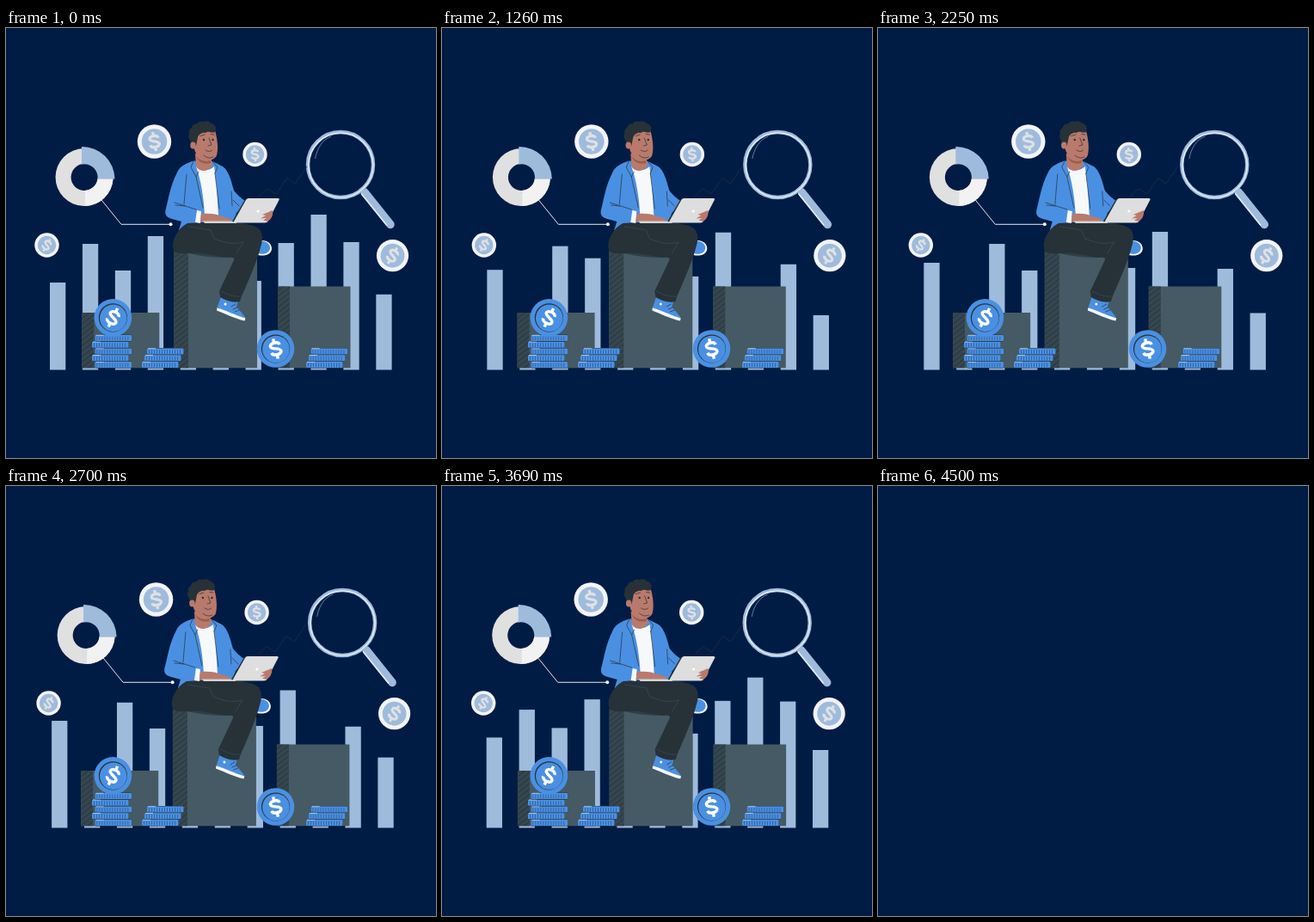
Animation of 500 by 500 pixels, one loop 4.53 s. Source, as an HTML page:

```html
<!DOCTYPE html>
<html lang="en">
<head>
<meta charset="utf-8">
<title>Finance analysis</title>
<style>
  html, body { margin: 0; height: 100%; overflow: hidden; background: #011c44; }
  svg { display: block; width: 100vw; height: 100vh; }
  .line { fill: none; stroke: #263238; stroke-width: .7; stroke-linecap: round; stroke-linejoin: round; }
  .fold { stroke: #3f4d54; }
  .skin { fill: #b97a6c; }
  .blue { fill: #4a90e2; }
  .dark { fill: #263238; }
  .pale { fill: #9fbbdc; }
  .white { fill: #f7f8fa; }
</style>
</head>
<body>
<svg viewBox="0 0 500 500">
  <defs>
    <pattern id="hatch" width="5" height="5" patternUnits="userSpaceOnUse" patternTransform="rotate(52)">
      <rect width="5" height="5" fill="#35464f"/>
      <rect width=".8" height="5" fill="#263238"/>
    </pattern>
    <path id="dollar" fill="none" stroke-width="3.5"
      d="M5.600-3.600C5-8.200-5.200-8-5.200-3.800C-5.200 .4 5.600-.6 5.600 3.800C5.600 8.200-4.800 8.200-5.800 3.600M0-12V-7M0 7V12"/>
  </defs>

  <g id="stage">
    <g id="back">
      <g id="bars" class="pale"></g>

      <!-- donut chart -->
      <path d="M90.500 140A33.500 33.500 0 1 0 124.500 175H106.500A15.500 15.500 0 1 1 91 158Z" fill="#e0e0e0"/>
      <path d="M92 207A33.500 33.500 0 0 0 124.500 176H106.500A15.500 15.500 0 0 1 92 189Z" fill="#f2f2f2"/>
      <path d="M88 138A38 38 0 0 1 126.500 175.500H106.500A15.500 15.500 0 0 0 88 158.500Z" class="pale"/>
      <path d="M111 200L134 228.300H191" fill="none" stroke="#e3e8ef"/>
      <circle cx="191.500" cy="228.300" r="2" class="white"/>

      <!-- magnifier -->
      <path d="M412.500 186L420 195" stroke="#9fbbdc" stroke-width="6"/>
      <path d="M417 191L447 228.500" stroke="#9fbbdc" stroke-width="9.500" stroke-linecap="round"/>
      <path d="M413.500 193L442.500 229" stroke="#e6ebf1" stroke-width="1.600" stroke-linecap="round"/>
      <circle cx="389" cy="159" r="38" fill="none" stroke="#9fbbdc" stroke-width="4.400"/>
      <circle cx="389.300" cy="159.500" r="37.600" fill="none" stroke="#e9edf2" stroke-width="1.400"/>
      <path d="M359.500 152C362 139 368 130 378 126" fill="none" stroke="#9fbbdc" stroke-width=".6"/>
      <g id="floaters"></g>
    </g>

    <g id="front">
      <path class="line" d="M295 195L304 187L314 193L327 174.500L336 181L350 161"/>
      <g id="blocks"></g>
      <path d="M212 260H258V267C240 267 225 265 212 262Z" fill="#2f3f47"/>

      <!-- far shoe -->
      <path d="M292 248C302 245 309 250 309 257C308 263 302 266 293 264Z" class="white"/>
      <path d="M291 248C301 246 307 250 307 256C306 262 301 264 292 262Z" class="blue"/>

      <!-- near shoe -->
      <path d="M250 312L270 317L268 324L278 336L277 339L245 327Z" class="blue"/>
      <path d="M245.500 325.500C256 328 266 334 278.500 337.500L277.500 340.500C266 338 255 332 245 328.500Z" class="white"/>
      <path d="M262 324L267 321M264 327L269 325M266 330L271 328" class="line"/>
      <circle cx="255" cy="321" r="1.500" class="white"/>

      <!-- jacket and shirt -->
      <path d="M218 154.500C208 158 202 161 199 168C191 183 189 199 185.500 212C184.500 218 187 220 193 222L204 225L201 235H262L268 215L280 202C274 199 268 193 265 189C261 174 258 165 252 161L240 155Z" class="blue"/>
      <path d="M221 161C226 166 236 167 242 161L245 184L247 218H231C230 198 227 178 221 161Z" class="white"/>
      <path d="M218 155L215 162L221 173L224 167M240 155L246 162L243 169M221 173L229 209M210 170L207 205M196 203L221 211M197 206L208 207M243 169L248 210M262 190L263 207M264 200L271 207" class="line"/>

      <!-- head -->
      <path d="M220 146L221 161C225 168 236 168 240 159L238 149Z" class="skin"/>
      <path d="M221 149C226 155 232 156 238 154V157C231 159 224 157 221 149Z" fill="#9b5e4d"/>
      <path d="M220 122C226 117 238 116 243 119C246 130 247 140 245 148C242 155 232 155 226 151C220 147 218 140 218 133Z" class="skin"/>
      <path d="M215 138L214 130Q211 127 213 123Q212 118 216 116Q217 111 222 111.500Q225 107 230 109Q235 107 238 110.500Q244 112 244 117L243 121C239 123 236 119 232 122C228 121 224 124 223 127L221 137Z" class="dark"/>
      <ellipse cx="217.500" cy="136.500" rx="3.200" ry="4" class="skin"/>
      <path d="M226 125.500L231 124M238 123.500L242 124M236 128L239 136L235 137M230 148C233 151 237 152 241 150M232 142C235 144 238 144 240 142" class="line"/>
      <g class="dark"><circle cx="230" cy="130" r="1.200"/><circle cx="240.500" cy="130" r="1.200"/></g>

      <!-- legs -->
      <path d="M211 227C198 234 190 251 196 260C201 264 214 261 228 262L258 267C264 266 266 267 265 270L248 306L249 313C256 317 264 320 272 318L274 312C282 294 293 268 296 255C300 243 298 234 290 231C282 227 260 225 245 225Z" class="dark"/>
      <path d="M213 231L238 235L242 245C255 250 264 252 276 249L268 262M250 306C258 310 265 313 273 312" class="line fold"/>

      <!-- hands and laptop -->
      <path d="M222 212L227 213L226 227L220 226Z" class="white"/>
      <path d="M227 216C237 215 245 216 251 219L262 222L259 225H226Z" class="skin"/>
      <path d="M229 224.500H268V227H231Z" fill="#d4d4d4"/>
      <path d="M278 199L263 225L268 226L283 200Z" class="dark"/>
      <path d="M282 198H316Q318.500 198 317.500 200L305 224Q304 226.500 301 226.500H266Q264 226.500 265.500 224L279 200Q280 198 282 198Z" fill="#dedede"/>
      <circle cx="293" cy="213" r="1.600" fill="#fff"/>
      <path d="M310 212C311 217 309 222 304 225L299 223.500L303 221L296 221.500L302 218L298 217Z" class="skin"/>
    </g>
    <g id="money"></g>
  </g>
</svg>

<script>
const LOOP = 4530, BLANK_AT = 4500, FLOOR = 397.5;
const $ = id => document.getElementById(id);
const smooth = u => u * u * (3 - 2 * u);
const wave = t => (1 + Math.cos(t / LOOP * 2 * Math.PI)) / 2;

const rect = (x, y, w, h, extra = '') => `<rect x="${x}" y="${y}" width="${w}" height="${h}" ${extra}/>`;
const circle = (x, y, r, extra) => `<circle cx="${x}" cy="${y}" r="${r}" ${extra}/>`;
const dollar = (x, y, size, tilt, color) =>
  `<use href="#dollar" stroke="${color}" transform="translate(${x} ${y}) rotate(${tilt}) scale(${size})"/>`;

// Each bar swings once per loop from its resting top to a second top, reached at peak.
const swing = (rest, far, peak = 2200) => t => rest + (far - rest) * smooth(smooth(wave(t - peak)));
const hidden = swing(300, 300);
const barTops = [
  swing(296, 273, 2300), swing(251, 370), swing(282, 251, 2050), swing(242, 282, 2300),
  hidden, hidden,
  swing(294, 279, 2500), swing(250, 237, 2000), swing(217, 330, 2150), swing(249, 280, 2150),
  swing(307, 334, 1450)
];
$('bars').innerHTML = barTops.map((_, i) => rect(51 + 37.93 * i, 0, 18.3, 0)).join('');
const bars = [...$('bars').children];

const paleCoin = (x, y, r, tilt) => circle(x, y, r, 'fill="#f3f4f5"')
  + circle(x, y, r * .75, 'class="pale"') + dollar(x, y, r / 21, tilt, '#dfe1e4');

const blueCoin = (x, y, tilt) => circle(x, y, 21.8, 'class="blue"') + circle(x, y, 16.6, 'class="dark"')
  + circle(x + .4, y + .5, 15.8, 'class="blue"') + dollar(x, y, 1, tilt, '#fff');

const block = (x, y, w, side) => rect(x, y, w, 395.3 - y, 'fill="#455a64"')
  + rect(x, y, side, 395.3 - y, 'fill="url(#hatch)"');

function stack(count, leftOf) {
  return Array.from({ length: count }, (_, i) => {
    const x = leftOf(i), y = 388 - 7.75 * i;
    return rect(x, y - .4, 42.5, 7.8, 'rx="1" class="dark"')
      + rect(x, y, 42.5, 7, 'rx="1" class="blue"')
      + `<path d="M${x + 2} ${y + 4}h39" stroke="#2c5590" stroke-width="5" stroke-dasharray=".7 2.3"/>`
      + `<path d="M${x + 1} ${y + .2}h9" stroke="#dfe9f5" stroke-width=".7"/>`;
  }).join('');
}

$('floaters').innerHTML = paleCoin(172.5, 132, 19.7, -10) + paleCoin(289.5, 147, 14.2, -5)
  + paleCoin(47.5, 252.5, 14.2, 30) + paleCoin(449.5, 264.7, 18.6, 30);
$('blocks').innerHTML = block(88.3, 331, 90, 14) + block(195, 259, 97, 17) + block(316, 300.5, 84.5, 14);
$('money').innerHTML = stack(5, i => 103.5 - 3.5 * (i % 2)) + stack(3, i => 158 + 3 * i)
  + stack(3, i => 349 + 2.8 * i) + blueCoin(124.4, 336.8, 26) + blueCoin(313.5, 373, -14);

function draw(now) {
  const t = now % LOOP;
  const sway = 1 - wave(t);
  $('stage').setAttribute('visibility', t < BLANK_AT ? 'visible' : 'hidden');
  $('back').setAttribute('transform', `translate(${2.3 * sway})`);
  $('front').setAttribute('transform', `translate(${-1.2 * sway})`);
  bars.forEach((bar, i) => {
    const top = barTops[i](t);
    bar.setAttribute('y', top);
    bar.setAttribute('height', FLOOR - top);
  });
  requestAnimationFrame(draw);
}
requestAnimationFrame(draw);
</script>
</body>
</html>
```
